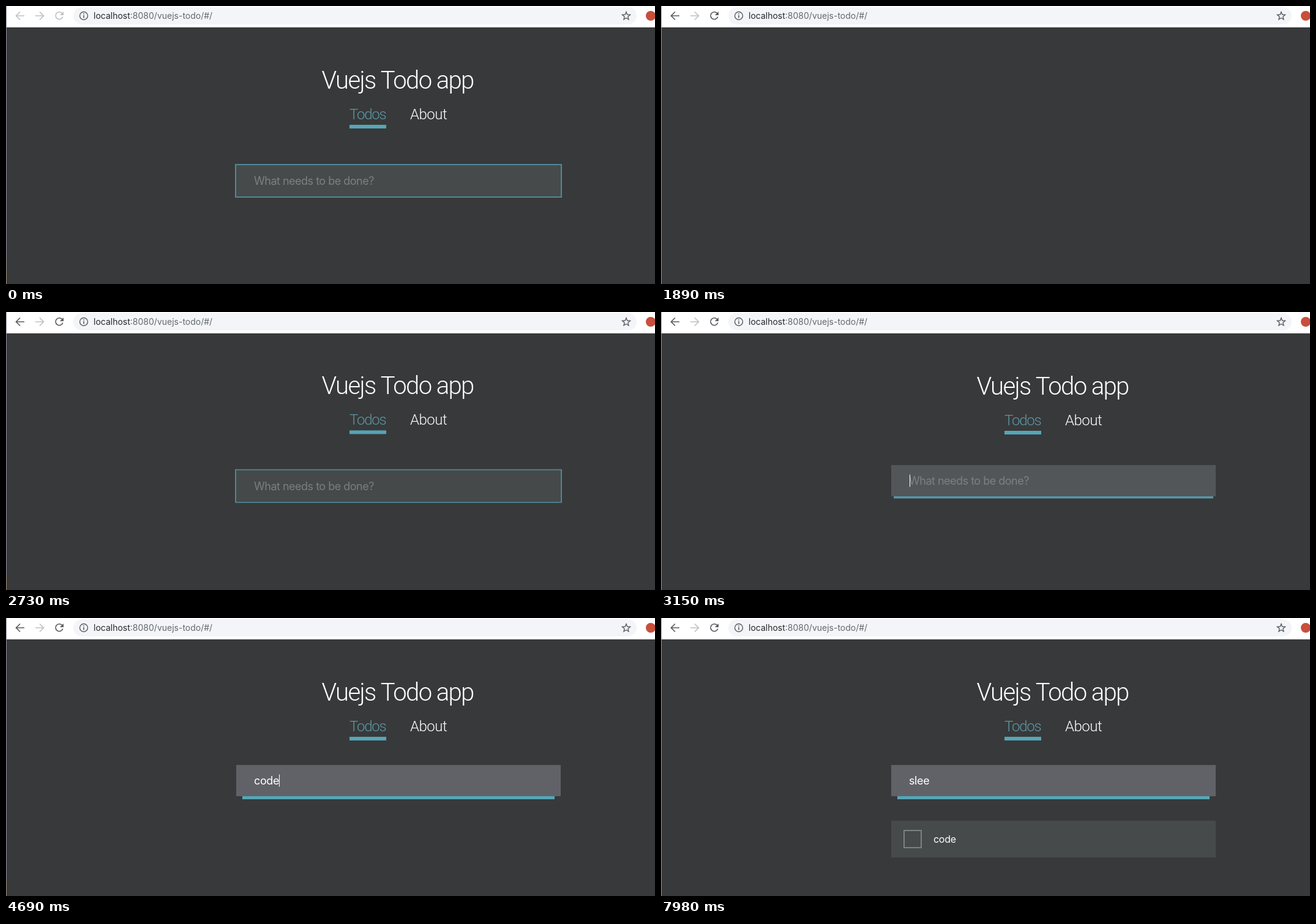
An HTML page with a canvas that plays this animation: 1060x454 px, repeating every 8000 ms.

```html
<!DOCTYPE html>
<html lang="en">
<head>
<meta charset="utf-8">
<title>Vuejs Todo app</title>
<style>
html, body { margin: 0; width: 100%; height: 100%; overflow: hidden; background: #38393a; }
canvas { display: block; }
</style>
</head>
<body>
<canvas id="stage" width="1060" height="454"></canvas>
<script>
const ctx = document.getElementById('stage').getContext('2d');
const LOOP = 8000, STEP = 70;
const ACTIVATE = 1120, BLANK = 1820, ENTER = 1895, FOCUS = 2915, SUBMIT = 4800;
const UI = 'Inter, "Open Sans", sans-serif', HEAD = 'Roboto, Inter, sans-serif';
const TEAL = [85, 166, 182];

// Input contents after each key press
const KEYS = [
  [FOCUS, ''], [4130, 'c'], [4270, 'co'], [4480, 'cod'], [4690, 'code'], [SUBMIT, ''],
  [5740, 's'], [6300, 'sl'], [6720, 'sle'], [7140, 'slee']
];

const clamp = v => Math.min(1, Math.max(0, v));
const mix = (a, b, k) => a + (b - a) * k;
const rgb = (a, b = a, k = 0) => `rgb(${a.map((v, i) => Math.round(mix(v, b[i], k)))})`;

// CSS "ease": cubic-bezier(.25, .1, .25, 1)
function ease(x) {
  x = clamp(x);
  const curve = (p, q, u) => 3 * p * u * (1 - u) ** 2 + 3 * q * u * u * (1 - u) + u ** 3;
  let lo = 0, hi = 1;
  for (let i = 0; i < 20; i++) {
    const mid = (lo + hi) / 2;
    if (curve(.25, .25, mid) < x) lo = mid; else hi = mid;
  }
  return curve(.1, 1, lo);
}

function rect(x, y, w, h, color) {
  ctx.fillStyle = color;
  ctx.fillRect(x, y, w, h);
}

function text(str, x, y, font, color, spacing = 0) {
  ctx.font = font;
  ctx.letterSpacing = spacing + 'px';
  ctx.fillStyle = color;
  ctx.fillText(str, x, y);
  return ctx.measureText(str).width;
}

function path(d, color, width = 1.7) {
  ctx.strokeStyle = color;
  ctx.lineWidth = width;
  ctx.stroke(new Path2D(d));
}

function disc(x, y, r, color) {
  ctx.fillStyle = color;
  ctx.beginPath();
  ctx.arc(x, y, r, 0, 7);
  ctx.fill();
}

// Draws a part that fades in while dropping 40px into place
function fadeDown(k, draw) {
  ctx.save();
  ctx.globalAlpha *= k;
  ctx.translate(0, -40 * (1 - k));
  draw();
  ctx.restore();
}

// Hard-edged box shadow, visible only outside its box
function shadow(x, y, w, h, drop, spread, color) {
  ctx.save();
  ctx.beginPath();
  ctx.rect(0, -100, 1060, 700);
  ctx.rect(x, y, w, h);
  ctx.clip('evenodd');
  rect(x - spread, y + drop - spread, w + 2 * spread, h + 2 * spread, color);
  ctx.restore();
}

function drawToolbar(active) {
  const dark = '#5a5d61', pale = '#bfc1c4', on = active ? dark : pale;
  rect(0, 0, 1060, 35, '#fff');
  rect(0, 34, 1060, 1, '#e2e4e6');
  ctx.fillStyle = '#f3f5f8';
  ctx.beginPath();
  ctx.roundRect(110, 2, 920, 28, 14);
  ctx.fill();

  path('M30 16H17M23 9.5L16.5 16L23 22.5', on);
  path('M48 16H61M55 9.5L61.5 16L55 22.5', pale);
  path('M91.6 11.8A6 6 0 1 0 92.8 17.5', on);
  ctx.fillStyle = on;
  ctx.fill(new Path2D('M94 9V15H88Z'));

  path('M133.5 16A6.5 6.5 0 1 1 120.5 16A6.5 6.5 0 1 1 133.5 16', dark, 1.4);
  rect(126.2, 15, 1.6, 4.5, dark);
  rect(126.2, 12, 1.6, 1.7, dark);

  const host = text('localhost', 143, 21, `14px ${UI}`, '#26282b');
  text(':8080/vuejs-todo/#/', 143 + host, 21, `14px ${UI}`, '#65686c');

  let star = '';
  for (let i = 0; i < 10; i++) {
    const r = i % 2 ? 3 : 6.8, a = i * Math.PI / 5 - Math.PI / 2;
    star += `${i ? 'L' : 'M'}${1013 + r * Math.cos(a)} ${16.5 + r * Math.sin(a)}`;
  }
  path(star + 'Z', dark, 1.4);
  disc(1053, 16, 8, '#c84f3b');
}

function drawInput(t) {
  const k = ease((t - FOCUS) / 800), y = 260 - 20 * k;
  shadow(376, y, 530, 51, 15 * k, 2 - 12 * k, rgb([79, 137, 153], TEAL, k));
  rect(376, y, 530, 51, rgb([70, 74, 74], [96, 98, 104], k));

  const [pressed, value] = KEYS.findLast(key => key[0] <= t) || [Infinity, ''];
  const font = `18px ${UI}`, base = y + 32;
  if (!value) text('What needs to be done?', 405, base, font, '#7d8080', -.5);
  const width = value ? text(value, 405, base, font, '#fff', -.4) : .5;
  if (t >= pressed && (t - pressed) % 1000 < 500) rect(Math.round(405 + width), y + 15.5, 1, 20, '#fff');
}

function drawItem() {
  rect(376, 331, 530, 60, '#464a4a');
  ctx.strokeStyle = '#7c8081';
  ctx.lineWidth = 2;
  ctx.strokeRect(397, 347, 28, 28);
  text('code', 445, 367, `16px ${UI}`, '#fff', -.3);
}

function drawApp(t) {
  const shown = t < BLANK ? 1 : ease((t - ENTER) / 1000);
  fadeDown(shown, () => {
    text('Vuejs Todo app', 515.5, 134.5, `300 40px ${HEAD}`, '#fff', -1.6);
    text('Todos', 561, 185, `300 24px ${HEAD}`, '#5b99a6', -1.25);
    text('About', 660, 185, `300 24px ${HEAD}`, '#fff', -.5);
    rect(561, 194, 60, 6, rgb(TEAL));
    fadeDown(shown, () => drawInput(t));
  });
  if (t >= SUBMIT) fadeDown(ease((t - SUBMIT) / 700), drawItem);
}

function frame(now) {
  const t = Math.floor(now % LOOP / STEP) * STEP;
  rect(0, 0, 1060, 454, '#38393a');
  drawApp(t);
  drawToolbar(t >= ACTIVATE);
  rect(0, 0, 1, 430, '#8d929c');
  rect(0, 430, 1, 24, '#a08f72');
  requestAnimationFrame(frame);
}
requestAnimationFrame(frame);
</script>
</body>
</html>
```
